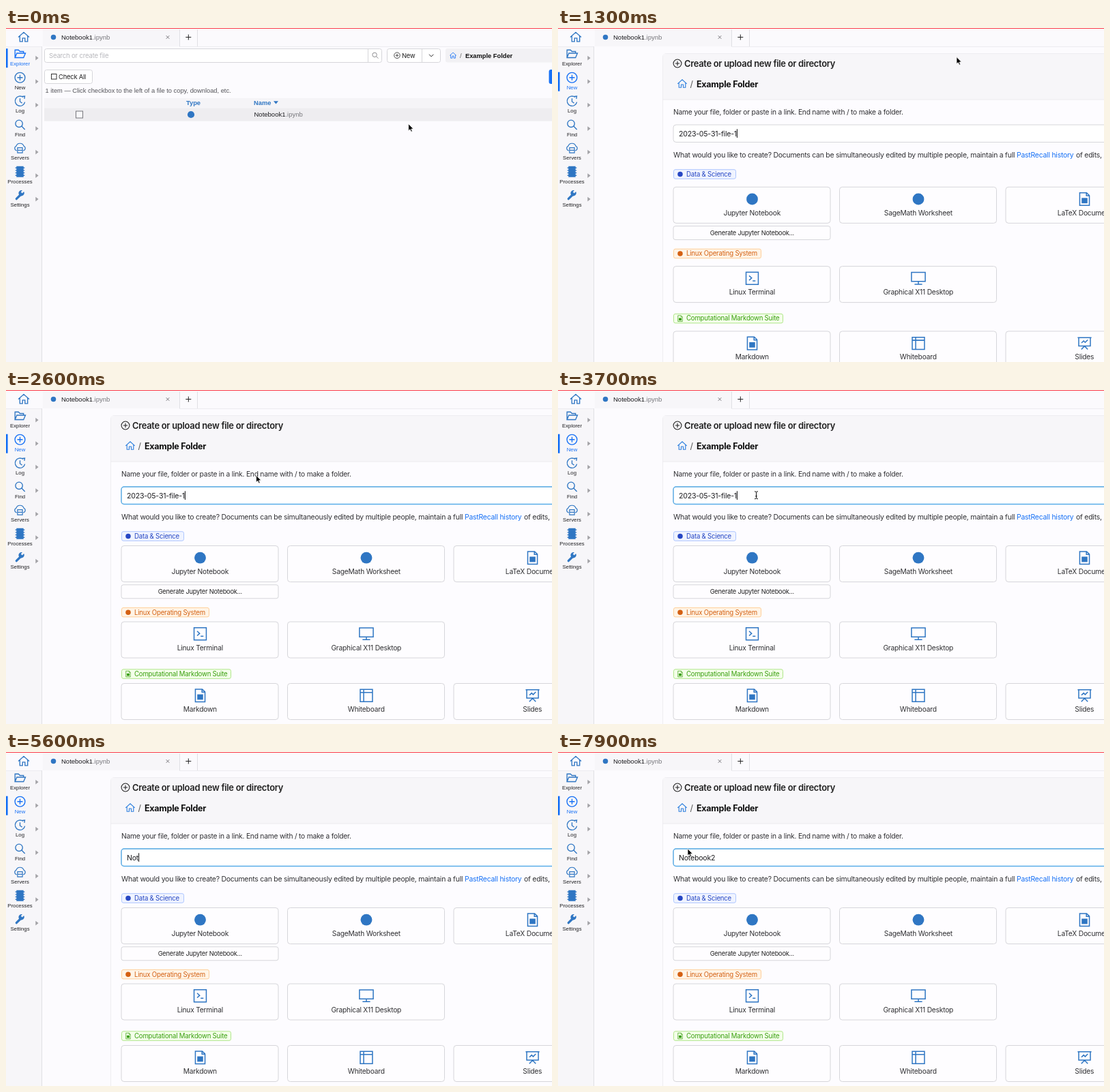
An HTML page for the animation above (8 s loop, 800 by 490 pixels).

```html
<!DOCTYPE html>
<html lang="en">
<head>
<meta charset="utf-8">
<title>Create a file</title>
<style>
  html, body { margin: 0; width: 100%; height: 100%; overflow: hidden; background: #fcfbfe; }
  svg { display: block; }
  text { white-space: pre; }
  .ui { font-family: Inter, sans-serif; letter-spacing: -.022em; }
  .plain { font-family: "Liberation Sans", Arial, sans-serif; }
</style>
</head>
<body>
<svg id="stage" width="800" height="490" viewBox="0 0 800 490"></svg>
<script>
const BLUE = '#2f76c3', ACTIVE = '#1670f5', INK = '#303033', LINE = '#d6d6da';
const LOOP = 8000, STEP = 100;

// Icons are centred on 0,0 in a box of about 16 units.
const ICONS = {
  home: '<path d="M-8 .3 0-7 8 .3M-5.7-1.5V6.6H-1.8V1.5H1.8V6.6H5.7V-1.5"/>',
  folder: '<path d="M-7.3 5.3V-6H-2.2L0-3.7H5.2V-1.2M-7.3 5.3-4.6-1.2H8L5.2 5.3Z"/>',
  plus: '<circle r="7.4"/><path d="M-4 0H4M0-4V4"/>',
  clock: '<path d="M4.6-5.6A7.2 7.2 0 1 0 7.1 1.4M3.4-6.8 7-7.2 6.4-3.4M0-4V.8L3.2 3"/>',
  find: '<circle cx="-1.4" cy="-1.4" r="5.2"/><path d="M2.4 2.4 7.2 7.2"/>',
  servers: '<path d="M-4.8 3.6A3.4 3.4 0 0 1-5.6-2.9 5.9 5.9 0 0 1 5.6-2.9 3.4 3.4 0 0 1 4.8 3.6M-3.6-.6H3.6V7H-3.6ZM-3.6 3.2H3.6" stroke-width="1.2"/>',
  chip: '<path d="M-4.5-7.3H4.5V7.3H-4.5Z" fill="currentColor"/><path d="M-6.8-5.5H6.8M-6.8-1.8H6.8M-6.8 1.8H6.8M-6.8 5.5H6.8"/>',
  wrench: '<path d="M-5.2 5.5 1-.7" stroke-width="3.2" stroke-linecap="round"/><path d="M5.7-5.2 3.3-2.8 1.2-4.8 3.5-7A4.2 4.2 0 1 0 5.7-5.2Z" fill="currentColor" stroke="none"/>',
  disc: '<circle r="7.5" fill="currentColor" stroke="none"/>',
  file: '<path d="M-6.3-8.3H2.7L6.3-4.7V8.3H-6.3ZM2.4-8V-4.4H6"/><rect x="-3.8" y="-1.5" width="7.6" height="7" fill="currentColor" stroke="none"/>',
  terminal: '<path d="M-8-8H8V8H-8ZM-4-3.5-.7-.5-4 2.5M.6 3.2H4.3"/>',
  desktop: '<path d="M-9-7.8H9V4H-9ZM0 4V7.5M-5 7.7H5"/>',
  board: '<path d="M-8-8H8V8H-8ZM-8-4H8M-3.5-8V8"/>',
  slides: '<path d="M-9-7.5H9M-7.6-7.5V3.4H7.6V-7.5M-4.2 8 0 3.6 4.2 8M-4-.5-1.2-3.2.8-1.2 4.2-4.6"/>'
};

const icon = (name, x, y, scale = 1, color = BLUE) =>
  `<g transform="translate(${x} ${y}) scale(${scale})" color="${color}" fill="none" stroke="currentColor" stroke-width="1.35">${ICONS[name]}</g>`;
const box = (x, y, w, h, fill, stroke = 'none', r = 0) =>
  `<rect x="${x}" y="${y}" width="${w}" height="${h}" rx="${r}" fill="${fill}" stroke="${stroke}"/>`;
const path = (d, stroke, fill = 'none') => `<path d="${d}" stroke="${stroke}" fill="${fill}"/>`;
const text = (x, y, str, size, { fill = INK, face = 'ui', weight = 400, anchor = 'start' } = {}) =>
  `<text x="${x}" y="${y}" class="${face}" font-size="${size}" font-weight="${weight}" fill="${fill}" text-anchor="${anchor}">${str}</text>`;
const plain = (x, y, str, size, opts = {}) => text(x, y, str, size, { face: 'plain', ...opts });
const fileName = (x, y) => plain(x, y, 'Notebook1<tspan fill="#77777c">.ipynb</tspan>', 9.5, { fill: '#1d1d20' });

function sidebar(active) {
  const items = [['Explorer', 'folder'], ['New', 'plus'], ['Log', 'clock'], ['Find', 'find'],
                 ['Servers', 'servers'], ['Processes', 'chip'], ['Settings', 'wrench']];
  return items.map(([label, name], i) => {
    const y = 38.2 + i * 34.5, on = i === active;
    return (on ? box(0, y - 8, 2.6, 28, ACTIVE) : '')
      + icon(name, 20.5, y, 1, on ? ACTIVE : BLUE)
      + plain(20.5, y + 17, label, 7.8, { anchor: 'middle', fill: on ? ACTIVE : '#1f1f22' })
      + path(`M43.3 ${y + 2.5}V${y + 9.3}L47.6 ${y + 5.9}Z`, 'none', '#a2a2a6');
  }).join('');
}

const frameChrome = () =>
  box(0, 0, 53, 490, '#f7f6f9') + box(0, 0, 800, 27, '#fbfafd') + box(54, 1, 200, 26, '#f7f6f9')
  + path('M52.5 27V490M254.5 2V27M280.5 2V27', '#e0e0e4') + path('M0 27.5H52M254 27.5H800', '#ececf0')
  + box(0, 0, 800, 1, '#fb3b48')
  + icon('home', 26, 13.3) + icon('disc', 69.5, 13.5, .5) + fileName(81, 17)
  + path('M234.7 11.2 239.3 15.8M234.7 15.8 239.3 11.2', '#77777c')
  + path('M263.3 13.5H271.3M267.3 9.5V17.5', '#222');

const explorer = () =>
  box(56.5, 30.5, 494, 20, '#fff', LINE, 3) + path('M530.5 30.5V50.5', LINE)
  + text(63, 44, 'Search or create file', 9.6, { fill: '#b8b8bd' })
  + icon('find', 541, 40.2, .62, '#77777c')
  + box(558.5, 30.5, 78, 20, '#fff', LINE, 3) + path('M609.5 30.5V50.5', LINE)
  + `<g id="newHover">${box(558.5, 30.5, 51, 20, 'none', '#4096ff', 3)}</g>`
  + icon('plus', 573, 40.2, .58, '#222') + text(580, 44, 'New', 9.4, { fill: '#222' })
  + path('M620 38.7 623.2 42 626.4 38.7', '#333')
  + box(644, 30, 160, 20.5, '#f2f1f4', 'none', 3) + icon('home', 655, 40.2, .6, ACTIVE)
  + plain(665, 44, '/', 9.5, { fill: '#666' }) + plain(673, 43.8, 'Example Folder', 9.3, { weight: 700, fill: '#111' })
  + box(56.5, 61.5, 70, 20, '#fff', LINE, 3) + box(66.5, 67.5, 7.5, 7.5, 'none', '#333')
  + text(77, 75, 'Check All', 9.4, { fill: '#222' })
  + box(795.5, 61, 20, 21, ACTIVE, 'none', 3)
  + plain(57.5, 95, '1 item — Click checkbox to the left of a file to copy, download, etc.', 9.3, { fill: '#55555a' })
  + box(56, 103, 744, 14.5, '#f5f4f7') + box(56, 117.5, 744, 19, '#eeedf0')
  + plain(264, 113.3, 'Type', 9.3, { weight: 700, fill: BLUE })
  + plain(363, 113.3, 'Name', 9.3, { weight: 700, fill: BLUE }) + path('M392 107.2H399L395.5 111.5Z', 'none', BLUE)
  + box(102.5, 122, 10, 10, '#f8f8fa', '#77777c') + icon('disc', 271, 127, .68) + fileName(363.5, 130.4);

function tag(y, w, label, name, [bg, border, color]) {
  return box(169.5, y - 6.8, w, 13.5, bg, border, 2.5)
    + icon(name, 179, y, name === 'file' ? .52 : .5, color)
    + text(188, y + 3.3, label, 9.65, { fill: color });
}

const card = (col, y, label, name) => {
  const x = 169 + col * 243.5;
  return box(x, y, 230, 53, '#fefdff', LINE, 4) + icon(name, x + 115.5, y + 17.7, 1.12)
    + text(x + 115.3, y + 41.5, label, 10.25, { anchor: 'middle' });
};

const creator = () =>
  box(153.5, 37.5, 700, 500, '#fdfcff', '#eeedf1', 5) + box(154, 38, 646, 67, '#f7f6f9')
  + path('M153 105H800', '#ebeaee')
  + icon('plus', 175, 52, .8, '#222')
  + text(185, 57, 'Create or upload new file or directory', 12.9, { weight: 600, fill: '#222' })
  + icon('home', 182, 81.7, .84, '#2f80de') + text(193.5, 86.5, '/', 12.5, { fill: '#555' })
  + text(203, 86.6, 'Example Folder', 12.55, { weight: 700, fill: '#111' })
  + text(169, 126.6, 'Name your file, folder or paste in a link. End name with / to make a folder.', 10.25)
  + box(169, 142, 700, 25.5, '#fff', LINE, 4)
  + '<rect id="focusRing" x="169" y="142" width="700" height="25.5" rx="4" fill="none" stroke="#58ade8" stroke-width="1.4"/>'
  + '<rect id="selection" y="147" height="15.5" fill="#a9cdf6"/>'
  + '<text id="value" x="177" y="158.6" class="ui" font-size="10.6" fill="#1d1d20"></text>'
  + '<rect id="caret" y="148.3" width="1" height="12.7" fill="#111"/>'
  + text(169, 189.6, 'What would you like to create? Documents can be simultaneously edited by multiple people, maintain a full', 10.43)
  + text(672, 189.6, 'PastRecall history', 10.43, { fill: ACTIVE }) + text(759, 189.6, 'of edits,', 10.43)
  + tag(214.5, 91, 'Data &amp; Science', 'disc', ['#f0f4ff', '#adc6ff', '#2747c4'])
  + '<g class="section">'
  + card(0, 228.5, 'Jupyter Notebook', 'disc') + card(1, 228.5, 'SageMath Worksheet', 'disc') + card(2, 228.5, 'LaTeX Document', 'file')
  + box(169, 285.8, 230, 20, '#fefdff', LINE, 3)
  + text(284.3, 299.2, 'Generate Jupyter Notebook...', 9.22, { anchor: 'middle', fill: '#222' })
  + tag(326.2, 128, 'Linux Operating System', 'disc', ['#fff4e6', '#ffcf99', '#d46012'])
  + '</g><g class="section">'
  + card(0, 340, 'Linux Terminal', 'terminal') + card(1, 340, 'Graphical X11 Desktop', 'desktop')
  + tag(416.6, 160, 'Computational Markdown Suite', 'file', ['#f4ffea', '#b0e68a', '#389e0d'])
  + '</g><g class="section">'
  + card(0, 430.5, 'Markdown', 'file') + card(1, 430.5, 'Whiteboard', 'board') + card(2, 430.5, 'Slides', 'slides')
  + '</g>';

const pointers = () => `<g id="mouse">
  <path id="arrow" d="M0 0V10L2.3 8 4 11.6 5.6 10.9 4 7.4 7.1 7.2Z" fill="#000" stroke="#fff" stroke-width=".7"/>
  <path id="hand" d="M-1 0Q0-1 1 0V4L5 5Q6 5 6 6.5L5 11H0L-4 6Q-3 5-1 6.5Z" fill="#fff" stroke="#000" stroke-width=".9"/>
  <path id="beam" d="M-2.5-5.5Q0-5.5 0-4 0-5.5 2.5-5.5M0-4V4M-2.5 5.5Q0 5.5 0 4 0 5.5 2.5 5.5M-1.3 1.5H1.3" fill="none" stroke="#111" stroke-width="1"/>
</g>`;

const $ = id => document.getElementById(id);
$('stage').innerHTML = box(0, 0, 800, 490, '#fcfbfe')
  + `<g id="explorer">${explorer()}</g><g id="creator">${creator()}</g>` + frameChrome()
  + `<g id="navExplorer">${sidebar(0)}</g><g id="navNew">${sidebar(1)}</g>` + pointers();
const sections = document.querySelectorAll('.section');

const OPEN = 1200, FOCUS = 1300, SETTLE = 1400, DRAG = 3800, DRAG_END = 4300;
const KEYS = [5300, 5400, 5600, 5800, 6100, 6200, 6400, 6600, 7000];
const TRACK = [ // time, x, y
  [100, 589.7, 140.7], [800, 584, 41], [1200, 584, 42.6], [2000, 584, 42.6], [2900, 290.5, 154.3],
  [DRAG, 290.5, 154.3], [DRAG_END, 147, 154.3], [4500, 147, 154.3], [4900, 195, 155], [7700, 195, 155], [7900, 190, 142]
];

const clamp = (v, lo, hi) => Math.min(hi, Math.max(lo, v));
const show = (id, on) => $(id).setAttribute('visibility', on ? 'inherit' : 'hidden');

function mouseAt(t) {
  const i = TRACK.findIndex(k => k[0] > t);
  if (i === 0) return TRACK[0].slice(1);
  if (i < 0) return TRACK[TRACK.length - 1].slice(1);
  const [t0, x0, y0] = TRACK[i - 1], [t1, x1, y1] = TRACK[i];
  const u = (t - t0) / (t1 - t0), e = u * u * (3 - 2 * u);
  return [x0 + (x1 - x0) * e, y0 + (y1 - y0) * e];
}

function caretOn(t) {
  if (t >= KEYS[0]) return t - KEYS.filter(k => k <= t).pop() < 500;
  return t >= FOCUS && t < DRAG && Math.floor((t - FOCUS) / 500) % 2 === 0;
}

function draw(t) {
  const opened = t >= OPEN, [mx, my] = mouseAt(t);
  for (const id of ['creator', 'navNew']) show(id, opened);
  for (const id of ['explorer', 'navExplorer']) show(id, !opened);

  $('focusRing').setAttribute('opacity', clamp((t - FOCUS) / 200, 0, 1));
  sections.forEach((s, i) => s.setAttribute('transform', `translate(0 ${t < SETTLE ? 4.8 * (i + 1) : 0})`));

  const typed = KEYS.filter(k => k <= t).length;
  $('value').textContent = typed ? 'Notebook2'.slice(0, typed) : '2023-05-31-file-1';
  const end = 177 + $('value').getComputedTextLength();
  $('caret').setAttribute('x', end);
  show('caret', opened && caretOn(t));

  const from = t < DRAG_END ? clamp(mx, 177, end) : 177;
  $('selection').setAttribute('x', from);
  $('selection').setAttribute('width', end - from);
  show('selection', t >= DRAG && t < KEYS[0]);

  const onButton = !opened && my < 51, inField = opened && my > 143;
  $('mouse').setAttribute('transform', `translate(${mx} ${my})`);
  show('mouse', t < 5000 || t >= 7800);
  show('newHover', onButton);
  show('hand', onButton);
  show('beam', inField);
  show('arrow', !onButton && !inField);
}

const start = performance.now();
function tick() {
  const t = (performance.now() - start) % LOOP;
  draw(Math.floor(t / STEP) * STEP);
  requestAnimationFrame(tick);
}
tick();
</script>
</body>
</html>
```
